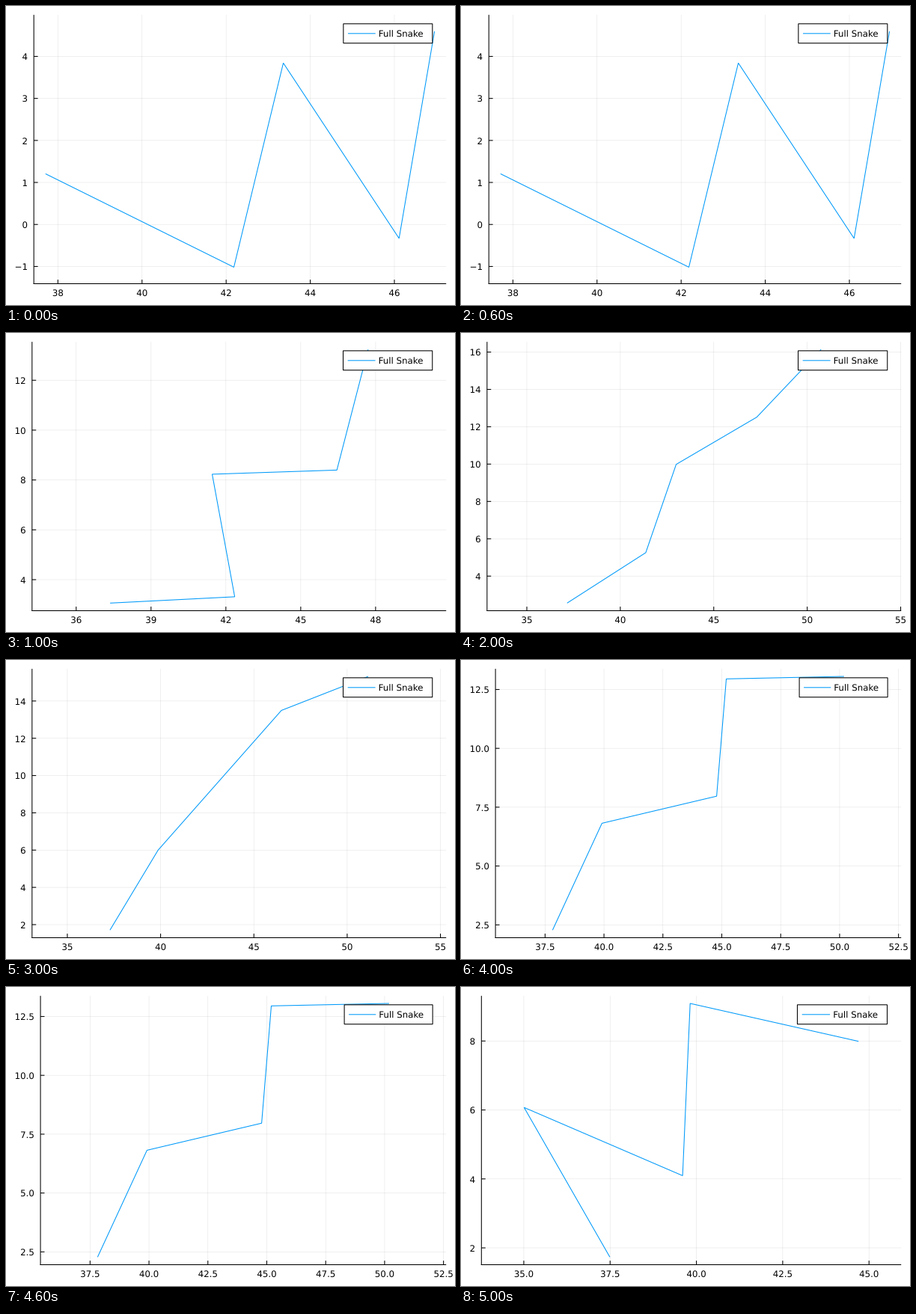
Recreate the animation shown at these times as a matplotlib script. Size 600x400 px, loop 6 s.

```python
import math

import matplotlib.pyplot as plt
import numpy as np
from matplotlib.animation import FuncAnimation
from matplotlib.patches import PathPatch, Rectangle
from matplotlib.textpath import TextPath
from matplotlib.transforms import Affine2D

W, H, DPI = 600, 400, 100
TOP, RIGHT, BOTTOM = 11.8, 588.2, 371.5
SIZE = 11.8
BLUE = "#009AFA"
PX = 72 / DPI  # one pixel in points
LINK = 5       # length of every link of the snake
MARGIN = 1.06  # room around the data

# tail position, heading of each link in degrees, tick steps in x and y
POSES = [
    ((37.705, 1.206), (-26.4, 76.4, -56.6, 80.3), (2, 1)),
    ((37.36, 3.06), (2.9, 100.4, 1.9, 75.5), (3, 2)),
    ((37.154, 2.555), (32.7, 71, 30.4, 46.5), (5, 2)),
    ((37.286, 1.707), (59, 48.6, 48.6, 21.4), (5, 2)),
    ((37.818, 2.278), (65.2, 13.3, 85.3, 1.2), (2.5, 2.5)),
    ((37.493, 1.733), (119.8, -23.3, 87.5, -12.7), (2.5, 2)),
]

fig = plt.figure(figsize=(W / DPI, H / DPI), dpi=DPI, facecolor="white")
ax = fig.add_axes([0, 0, 1, 1])


def line(xs, ys, color="black", width=1.05, alpha=1, z=2):
    ax.plot(xs, ys, color=color, lw=width * PX, alpha=alpha, zorder=z,
            snap=False, solid_capstyle="butt", solid_joinstyle="miter")


def advance(text):
    return SIZE * sum({".": 0.318, "\u2212": 0.838}.get(c, 0.636) for c in text)


def label(x, base, text, align=0.0):
    x -= align * advance(text)
    flip = Affine2D().scale(1, -1).translate(x, base)
    path = TextPath((0, 0), text, size=SIZE).transformed(flip)
    ax.add_patch(PathPatch(path, fc="black", lw=0, zorder=6, snap=False))


def snake(tail, headings):
    turns = np.radians(headings)
    links = LINK * np.column_stack([np.cos(turns), np.sin(turns)])
    return np.vstack([tail, tail + np.cumsum(links, axis=0)])


def ticks(mid, span, step):
    first = math.ceil((mid - span / 2) / step)
    last = math.floor((mid + span / 2) / step)
    places = 1 if step % 1 else 0
    for k in range(first, last + 1):
        yield k * step, f"{k * step:.{places}f}".replace("-", "\u2212")


def layout(joints, ystep):
    """Fit the data at equal aspect beside the widest y label."""
    low, high = joints.min(axis=0), joints.max(axis=0)
    mid = (low + high) / 2
    left = 35
    for _ in range(2):
        box = np.array([RIGHT - left, BOTTOM - TOP])
        scale = min(box / (MARGIN * (high - low)))
        marks = list(ticks(mid[1], box[1] / scale, ystep))
        left = 19.8 + max(advance(text) for _, text in marks)
    return left, mid, scale, marks


def legend(left):
    w = RIGHT - left
    right = RIGHT - w / 30
    pen = right - w / 45 - 59.8
    end = pen - w / 135
    start = end - w / 15
    edge = start - w / 90
    ax.add_patch(Rectangle((edge, 23.8), right - edge, 25.9, fc="white",
                           ec="black", lw=1.05 * PX, zorder=4, snap=False))
    line([start, end], [36.8, 36.8], BLUE, z=5)
    label(pen, 41.1, "Full Snake")


def draw(i):
    ax.clear()
    ax.set_xlim(0, W)
    ax.set_ylim(H, 0)
    ax.axis("off")

    tail, headings, (xstep, ystep) = POSES[i]
    joints = snake(tail, headings)
    left, mid, scale, ymarks = layout(joints, ystep)

    def px(x):
        return (left + RIGHT) / 2 + (x - mid[0]) * scale

    def py(y):
        return (TOP + BOTTOM) / 2 - (y - mid[1]) * scale

    for value, text in ticks(mid[0], (RIGHT - left) / scale, xstep):
        x = px(value)
        line([x, x], [TOP, BOTTOM], width=0.6, alpha=0.1, z=1)
        line([x, x], [BOTTOM, BOTTOM - 5.4])
        label(x, 388, text, 0.5)
    for value, text in ymarks:
        y = py(value)
        line([left, RIGHT], [y, y], width=0.6, alpha=0.1, z=1)
        line([left, left + 5.4], [y, y])
        label(left - 8.2, math.ceil(y + 4.3), text, 1)
    line([left, left], [TOP, BOTTOM + 0.5])
    line([left - 0.5, RIGHT], [BOTTOM, BOTTOM])
    line(px(joints[:, 0]), py(joints[:, 1]), BLUE, z=3)
    legend(left)
    return []


anim = FuncAnimation(fig, draw, frames=len(POSES), interval=1000,
                     init_func=lambda: draw(0), repeat=True, repeat_delay=0)
plt.show()
```
